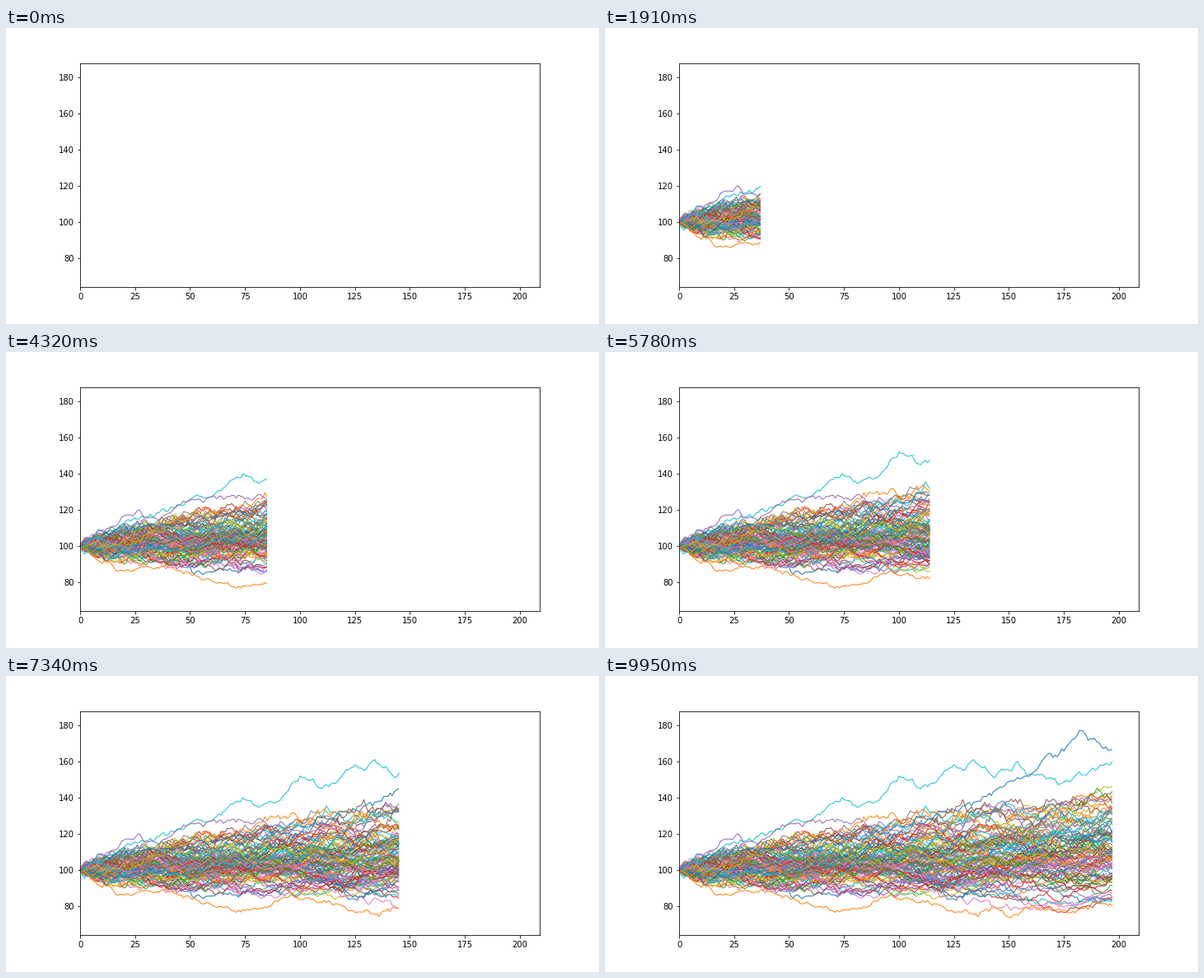
Recreate the animation shown at these times as a matplotlib script. Size 720 px wide and 360 px high, loop 10 s.

```python
import numpy as np
import matplotlib.pyplot as plt
from matplotlib.animation import FuncAnimation
from matplotlib.collections import LineCollection

FRAMES = 200
INTERVAL_MS = 50
LAST_DAY = 198
WALKS = 100
START = 100

rng = np.random.default_rng(7)
days = np.arange(LAST_DAY + 1)


def free_walks(count, drift=0.0006, sigma=0.0118):
    """Geometric random walks that stay inside a widening fan."""
    steps = rng.normal(drift, sigma, (4000, len(days)))
    steps[:, 0] = 0
    walks = START * np.exp(np.cumsum(steps, axis=1))
    top = START + 1 + 2.2 * np.sqrt(days) + 0.1 * days
    low = START - 1 - 2.7 * np.sqrt(days) + 0.07 * days
    inside = np.all((walks < top) & (walks > low), axis=1)
    return list(walks[inside][:count])


def guided_walk(*points):
    """A random walk from START that passes through the given points."""
    xs, ys = zip((0, START), *points)
    noise = np.cumsum(rng.normal(0, 1, len(days)))
    bridge = noise - np.interp(days, xs, noise[list(xs)])
    return np.interp(days, xs, ys) + bridge


walks = free_walks(WALKS)
colors = [f"C{i % 10}" for i in range(WALKS)]

# The paths that stand out from the fan
leaders = {
    "C9": guided_walk((37, 120), (74, 140), (88, 137), (100, 152), (110, 145),
                      (134, 161), (143, 151), (154, 160), (174, 148),
                      (198, 160)),
    "C0": guided_walk((80, 117), (125, 133), (145, 145), (174, 167),
                      (182, 177), (198, 165)),
    "C4": guided_walk((28, 118), (54, 126), (75, 126), (114, 124), (198, 140)),
    "C1": guided_walk((12, 91), (54, 83), (78, 78), (100, 84), (152, 75),
                      (198, 80)),
}
walks += leaders.values()
colors += leaders.keys()
paths = [np.column_stack([days, walk]) for walk in walks]

fig = plt.figure(figsize=(10, 5), dpi=72, facecolor="white")
ax = fig.add_axes([0.125, 0.125, 0.775, 0.755])
ax.set_xlim(0, 209)
ax.set_ylim(64, 187.6)
ax.set_xticks(range(0, 201, 25))
ax.set_yticks(range(80, 181, 20))

lines = LineCollection([], colors=colors, linewidths=1)
ax.add_collection(lines, autolim=False)


def draw(frame):
    count = min(frame, LAST_DAY)
    lines.set_segments([path[:count] for path in paths] if count > 1 else [])
    return [lines]


anim = FuncAnimation(fig, draw, frames=FRAMES, interval=INTERVAL_MS,
                     repeat=True, repeat_delay=0, blit=False)
plt.show()
```
